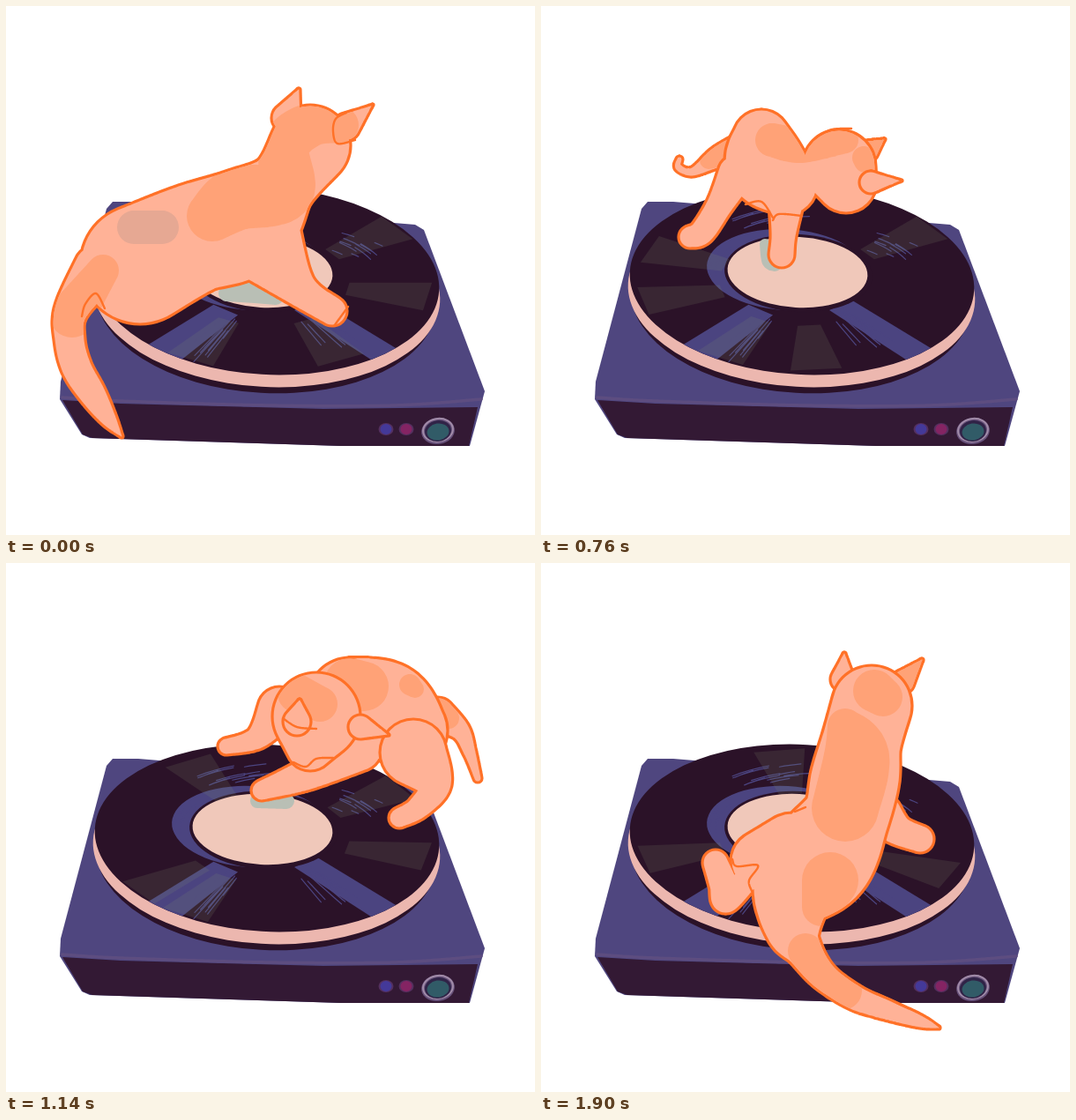
Recreate the animation shown at these times as an HTML page with a canvas. Size 600 by 600 pixels, loop 2.28 s.

```html
<!DOCTYPE html>
<html lang="en">
<head>
<meta charset="utf-8">
<title>Cat on a turntable</title>
<style>
html, body { margin: 0; width: 100%; height: 100%; overflow: hidden; background: #fff; }
canvas { display: block; width: 600px; height: 600px; }
</style>
</head>
<body>
<canvas id="stage" width="600" height="600"></canvas>
<script>
const ctx = document.getElementById('stage').getContext('2d');
const STEP = 380, TILT = 0.055, EDGE = 1.6;
const VINYL = '#2b1228', TOP = '#4f467f', FRONT = '#331934', SHINE = '#4b4480';
const FUR = '#ffb297', SPOT = '#ffa277', LINE = '#ff7127';

function seeded(seed) {
  return () => (seed = seed * 16807 % 2147483647) / 2147483647;
}

const parse = s => s.trim().split(/\s+/).map(t => t.split(',').map(Number));
const mix = (a, b, c, d, t) =>
  b + t * (c - a + t * (2 * a - 5 * b + 4 * c - d + t * (3 * (b - c) + d - a))) / 2;

// Visits points along a smooth line through the given knots.
function trace(s, visit) {
  const knots = parse(s), last = knots.length - 1;
  const at = i => knots[Math.max(0, Math.min(last, i))];
  for (let i = 0; i < last; i++) {
    for (let t = 0; t <= 1; t += 0.02) {
      visit(...at(i).map((v, k) => mix(at(i - 1)[k], v, at(i + 1)[k], at(i + 2)[k], t)));
    }
  }
  visit(...at(last));
}

// Round-ended limbs, each "x,y,radius ..." and parted by semicolons
function tubes(s, grow = 0) {
  const path = new Path2D();
  s.split(';').forEach(limb => trace(limb, (x, y, r) => {
    const radius = Math.max(0.1, r + grow);
    path.moveTo(x + radius, y);
    path.arc(x, y, radius, 0, Math.PI * 2);
  }));
  return path;
}

function line(s) {
  const path = new Path2D();
  trace(s, (x, y) => path.lineTo(x, y));
  return path;
}
function poly(s) {
  const path = new Path2D();
  parse(s).forEach(p => path.lineTo(...p));
  path.closePath();
  return path;
}
function oval(x, y, rx, ry, tilt = TILT) {
  const path = new Path2D();
  path.ellipse(x, y, rx, ry, tilt, 0, Math.PI * 2);
  return path;
}
function fill(path, color) {
  ctx.fillStyle = color;
  ctx.fill(path);
}
function stroke(path, color, width) {
  ctx.strokeStyle = color;
  ctx.lineWidth = width;
  ctx.stroke(path);
}

// Layers run from back to front; glints are angles on the record.
const poses = [
  {
    glints: [118, 63, -37, 10],
    shade: '250,326,9 282,325,12 306,330,9',
    layers: [{
      fur: `152,293,68 212,264,63 268,246,62 312,204,40 345,158,46; 285,260,50 330,318,22 370,346,17;
        318,127,17 332,95,2; 386,137,16 416,112,1;
        104,298,28 74,345,20 72,378,18 80,410,18 98,440,16 116,468,10 131,488,2`,
      spots: '234,238,29 264,218,36 316,210,33 316,160,28 345,135,25 380,135,20; 110,300,18 75,350,26',
      dim: '145,251,19 177,251,19'
    }],
    lines: ['86,352 90,338 102,326 112,343', '386,121 374,128 371,142 376,156 396,152', '372,363 388,341']
  },
  {
    glints: [-55, 10, 83, 130],
    shade: '245,275,12 262,292,12 305,300,12',
    layers: [
      {
        fur: `105,172,20 62,192,18 30,222,17 17,252,12 17,275,11; 150,238,20 110,225,14 88,212,9;
          345,104,8 344,88,1; 388,142,17 417,124,1`,
        spots: '65,185,20 100,170,25; 390,140,20 417,124,5'
      },
      {
        fur: `150,186,63 195,182,61 240,188,54 288,180,50 338,151,50; 338,152,48 362,190,18;
          282,235,20 288,270,17 305,288,16`,
        spots: '128,143,20 160,135,18; 190,162,26 240,162,30 300,148,30 320,125,28; 372,130,20 370,125,20'
      },
      { fur: '217,235,29 218,285,18 229,328,18' }
    ],
    lines: []
  },
  {
    glints: [-37, 201, 167, 85, 120],
    shade: '254,270,6 259,288,9 265,292,9',
    layers: [
      {
        fur: '225,165,20 200,172,13 172,188,6 156,183,5 157,174,4; 370,165,13 390,151,1',
        spots: '190,175,10 210,165,16; 372,165,12 390,151,3'
      },
      {
        fur: `250,150,33 255,180,46 278,202,36; 338,182,42 346,200,35;
          222,190,22 203,225,16 183,256,15 169,262,13; 278,225,20 275,260,15 273,282,15`,
        spots: '262,152,19 295,158,20 345,152,15; 366,172,13 368,176,13'
      },
      { fur: '374,200,13 409,198,1' }
    ],
    lines: ['313,148 330,140 352,139', '232,225 250,222 263,240', '263,243 270,236 296,238']
  },
  {
    glints: [241, -35, 12, 142, 120],
    shade: '285,270,8 318,270,9',
    layers: [
      { fur: '490,172,20 515,190,12 526,215,8 535,244,5', spots: '490,168,16 502,176,12' },
      {
        fur: `390,155,48 430,165,54 455,190,46; 400,210,27 340,240,19 290,258,12;
          310,165,25 285,198,14 250,208,10`,
        spots: '390,138,30 406,140,28; 458,138,12 464,143,10'
      },
      { fur: '462,215,38 486,250,20 468,277,14 446,289,12' },
      { fur: '352,174,50 345,208,28', spots: '330,148,22 356,160,20' },
      { fur: '330,180,16 333,156,2; 402,186,14 434,195,1' }
    ],
    lines: ['314,176 330,186 352,188', '326,226 340,231 352,222 371,221']
  },
  {
    glints: [208, 268, 138, 117],
    shade: '355,285,7 346,305,9',
    tint: '475,430,6 512,430,13',
    layers: [
      { fur: '403,95,13 403,70,2' },
      {
        fur: `375,138,47 400,190,38 430,235,54 452,290,60 450,345,60;
          400,252,22 350,246,15 313,243,11;
          420,330,38 372,315,29 362,350,24 345,400,16 318,385,16 290,364,14;
          480,375,30 512,398,19 540,411,15 560,404,11 565,388,8 560,377,7`,
        spots: `388,150,22 425,190,30 450,225,30 478,238,20; 395,107,18 402,110,18;
          482,297,24 490,300,24; 490,375,22 540,410,18`
      },
      { fur: '340,112,16 319,95,2' }
    ],
    lines: ['380,270 394,261 404,248', '385,262 393,276 418,297 446,314',
      '347,308 365,292 390,286 420,294 446,314', '388,370 384,350 389,328']
  },
  {
    glints: [262, 166, 25],
    layers: [
      {
        fur: '342,132,14 344,103,2; 410,135,14 432,110,2; 385,285,25 405,303,18 430,313,16',
        spots: '412,135,14 432,110,4'
      },
      {
        fur: `375,162,46 363,205,46 356,245,51 345,290,50 318,335,60 288,368,48 285,413,32
          297,437,22 320,468,17 356,493,15 395,508,12 430,520,8 451,527,2;
          285,325,42 250,338,35; 198,340,15 207,365,17 210,382,16 232,360,15`,
        spots: `378,145,24 388,152,22; 345,185,20 358,220,37 345,278,38;
          328,360,32 318,390,22; 300,440,20 342,485,22`
      }
    ],
    lines: ['217,336 222,344 246,343 236,360 239,372', '288,282 300,277']
  }
];

function drawDeck() {
  fill(poly('121,222 150,222 464,248 474,254 543,437 526,499 380,499 95,490 86,486 61,446 62,426 114,230'), TOP);
  fill(poly('64,447 130,451 360,457 535,455 525,499 380,499 98,490 87,486'), FRONT);
  stroke(line('64,444 130,448 300,453 440,453 539,446'), '#5d4d80', 3.5);
  for (const [x, color] of [[431, '#443999'], [454, '#842463']]) {
    fill(oval(x, 480, 8.5, 7, 0), '#54305f');
    fill(oval(x, 480, 6.5, 6, 0), color);
  }
  fill(oval(490, 482, 19, 15, -0.15), '#67517a');
  stroke(oval(490, 481, 17, 13, -0.15), '#a18ba8', 2);
  fill(oval(490, 482, 15, 12, -0.15), '#302347');
  fill(oval(490, 483, 12.5, 9.5, -0.15), '#315b67');
}

// A spot on the record: r is 0 at the centre and 1 at the rim.
function spot(r, degrees) {
  const a = degrees * Math.PI / 180;
  return [296 + 195 * r * Math.cos(a), 312 + 106 * r * Math.sin(a)];
}

function wedge(angle, inner, outer, from = 0.5, to = 1.1) {
  const path = new Path2D();
  path.moveTo(...spot(from, angle - inner));
  path.lineTo(...spot(to, angle - outer));
  path.lineTo(...spot(to, angle + outer));
  path.lineTo(...spot(from, angle + inner));
  return path;
}

// Loose pencil marks, along the grooves or out from the centre
function scribble(angle, spread, r0, r1, radial) {
  const rand = seeded(900 + angle), path = new Path2D();
  for (let i = 0; i < 11; i++) {
    const r = r0 + (r1 - r0) * rand(), a = angle + spread * (rand() * 2 - 1);
    const turn = radial ? 0 : spread * (0.3 + rand()), out = radial ? 0.2 + 0.2 * rand() : 0.02;
    path.moveTo(...spot(r, a));
    for (let t = 0.25; t <= 1; t += 0.25) path.lineTo(...spot(r + out * t, a + turn * t));
  }
  stroke(path, SHINE, 1.2);
}

function drawRecord(pose) {
  fill(oval(295, 332, 193, 107), VINYL);
  fill(oval(295.5, 325, 197, 107), '#ecb7af');
  const disc = oval(296, 312, 195.5, 106);
  fill(disc, VINYL);
  ctx.save();
  ctx.clip(disc);
  fill(wedge(128, 13, 7, 0.4), SHINE);
  fill(wedge(49, 14, 5, 0.35), SHINE);
  fill(oval(278, 299, 90, 46), SHINE);
  fill(oval(292, 303, 84, 44), VINYL);
  scribble(252, 14, 0.62, 0.82);
  scribble(-38, 12, 0.5, 0.75);
  scribble(200, 14, 0.5, 0.58);
  scribble(118, 6, 0.4, 0.6, true);
  scribble(58, 8, 0.38, 0.6, true);
  pose.glints.forEach(a => fill(wedge(a, 8, 9, 0.48, 0.96), 'rgba(125,135,105,0.17)'));
  ctx.restore();
  fill(oval(291, 302, 79.5, 40), '#f0c8ba');
  if (pose.shade) fill(tubes(pose.shade), '#b9bfb5');
  if (pose.tint) fill(tubes(pose.tint), '#4f3d90');
}

function drawLayer({ fur, spots, dim }) {
  const inside = tubes(fur, -EDGE);
  fill(tubes(fur, EDGE), LINE);
  fill(inside, FUR);
  ctx.save();
  ctx.clip(inside);
  if (spots) fill(tubes(spots), SPOT);
  if (dim) fill(tubes(dim), '#e6a893');
  ctx.restore();
}

function draw(pose) {
  ctx.fillStyle = '#fff';
  ctx.fillRect(0, 0, 600, 600);
  drawDeck();
  drawRecord(pose);
  pose.layers.forEach(drawLayer);
  pose.lines.forEach(s => stroke(line(s), LINE, 2.4));
}

ctx.lineJoin = ctx.lineCap = 'round';
let shown = -1;
function tick() {
  const index = Math.floor(performance.now() / STEP) % poses.length;
  if (index !== shown) draw(poses[shown = index]);
  requestAnimationFrame(tick);
}
tick();
</script>
</body>
</html>
```
